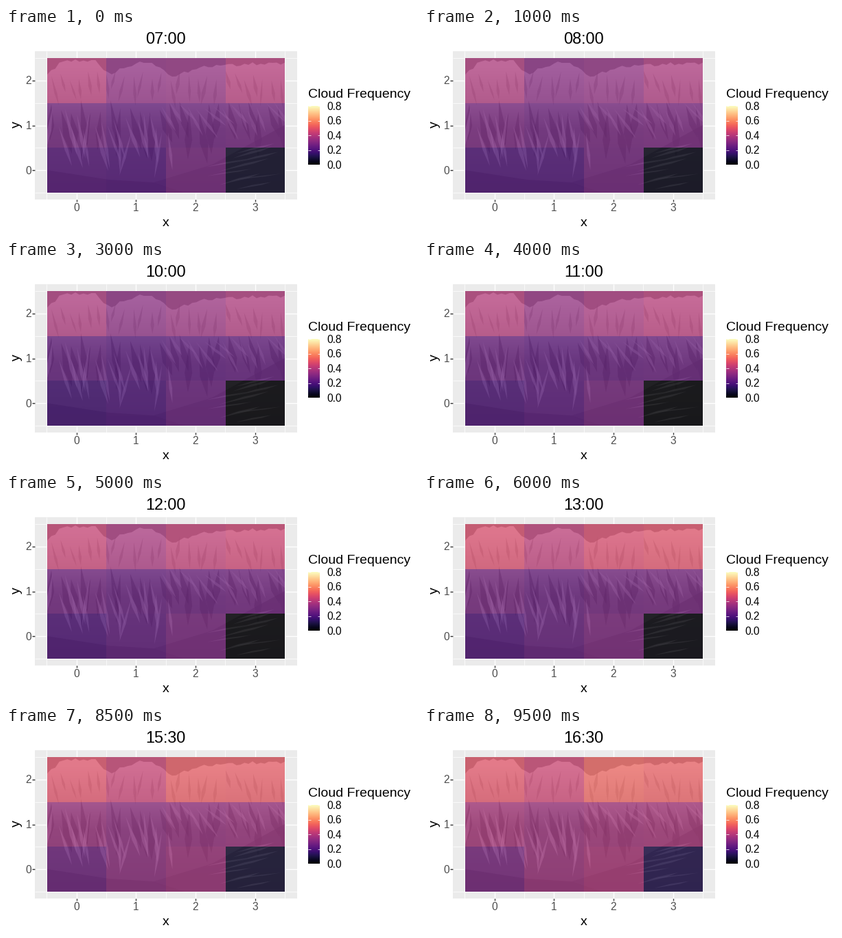
Write a matplotlib script that moves like this. It is 600 px wide and 300 px high and loops after 10 s.

```python
import matplotlib.pyplot as plt
import numpy as np
from matplotlib.animation import FuncAnimation
from matplotlib.patches import Polygon, Rectangle

plt.rcParams["font.family"] = "Liberation Sans"
W, H, DPI = 600, 300, 100
FRAMES, INTERVAL = 20, 500
LEFT, RIGHT, TOP, BOTTOM = 60, 406, 44, 241
X_EDGES = np.round(np.linspace(LEFT, RIGHT, 5))
Y_EDGES = np.round(np.linspace(TOP, BOTTOM, 4))
rng = np.random.default_rng(4)

# Daily course of each height band, on a 0..1 colour scale
KEY_STEPS = [0, 2, 4, 8, 12, 19]
SUMMIT = [.46, .44, .42, .47, .57, .61]
SLOPE = [.33, .35, .27, .31, .34, .47]
VALLEY = [.30, .29, .24, .30, .32, .44]


def cloud_grid(i):
    summit, slope, valley = (np.interp(i, KEY_STEPS, band)
                             for band in (SUMMIT, SLOPE, VALLEY))
    late = i / (FRAMES - 1)
    grid = np.array([
        summit + np.array([.05 - .04 * late, -.05, -.04 + .1 * late, .04]),
        slope + np.array([.01, -.02, 0, .01]),
        valley + np.array([-.03 - .05 * late, -.04 + .05 * late, .05, 0]),
    ])
    grid[2, 3] = .14 * ((i - 8) / 11) ** 2   # the clearest corner
    return grid


fig = plt.figure(figsize=(W / DPI, H / DPI), dpi=DPI, facecolor="white")
ax = fig.add_axes([0, 0, 1, 1])
ax.axis("off")


def gray(level):
    return (level / 255,) * 3


def label(x, y, text, size, color="black", **kw):
    kw = {"ha": "center", "va": "baseline", **kw}
    return ax.text(x, y, text, fontsize=size, color=color, zorder=9, **kw)


def line(xs, ys, color, width, z=1):
    ax.plot(xs, ys, color=color, lw=width * 72 / DPI, zorder=z,
            solid_capstyle="butt")


def shape(points, level, alpha):
    patch = Polygon(points, fc=gray(level), ec="none", alpha=alpha, zorder=3)
    ax.add_patch(patch)
    patch.set_clip_path(scene)


def streak(x, y, dx, dy, width, level, alpha):
    """A thin spindle from (x, y), widest past its middle."""
    xm, ym = x + .6 * dx, y + .6 * dy
    shape([(x, y), (xm + width / 2, ym), (x + dx, y + dy), (xm - width / 2, ym)],
          level, alpha)


# Panel, grid and axes
ax.add_patch(Rectangle((42, 34), 381.5, 216.5, fc="#EBEBEB", ec="none", zorder=0))
for k in range(5):
    x = 59.3 + 86.7 * k
    line([x, x], [34, 250.5], "white", .7)
    if k < 4:
        x += 43.3
        line([x, x], [34, 250.5], "white", 1.4)
        line([x, x], [250.5, 254.2], "#333333", 1.4)
        label(x, 268, str(k), 11.2, "#4D4D4D")
for k in range(4):
    y = 240.9 - 65.6 * k
    line([42, 423.5], [y, y], "white", .7)
    if k < 3:
        y -= 32.8
        line([42, 423.5], [y, y], "white", 1.4)
        line([38.3, 42], [y, y], "#333333", 1.4)
        label(37, y + 5.6, str(k), 11.2, "#4D4D4D", ha="right")
label(232.7, 290, "x", 14)
label(15.2, 141.5, "y", 14, rotation=90, va="center")
clock = label(232.7, 23, "", 16.8)

# Mountain scene: sky, a shaded range, ribs and gullies
scene = Rectangle((LEFT, TOP), RIGHT - LEFT, BOTTOM - TOP,
                  fc=gray(140), ec="none", zorder=2)
ax.add_patch(scene)
peaks = [(60, 66), (84, 48), (130, 47), (150, 67), (190, 51), (215, 51),
         (240, 71), (285, 57), (345, 53), (406, 51)]
ridge_x = np.linspace(LEFT, RIGHT, 60)
ridge_y = np.interp(ridge_x, *zip(*peaks)) + rng.uniform(-2.5, 2.5, 60)
outline = Polygon([*zip(ridge_x, ridge_y), (RIGHT, BOTTOM), (LEFT, BOTTOM)],
                  transform=ax.transData)
shade = np.interp(np.arange(TOP, BOTTOM), [55, 105, 150, 240], [225, 185, 120, 95])
slope_image = ax.imshow(shade[:, None], cmap="gray", vmin=0, vmax=255,
                        aspect="auto", extent=[LEFT, RIGHT, BOTTOM, TOP],
                        zorder=2.5)
slope_image.set_clip_path(outline)

for x in np.linspace(66, 400, 26):          # rock ribs near the summits
    streak(x, rng.uniform(62, 78), rng.uniform(-12, 12), rng.uniform(25, 45),
           rng.uniform(3, 6), 110, .4)
for x in np.linspace(66, 396, 24):          # wooded spurs
    streak(x, rng.uniform(105, 125), rng.uniform(-15, 20), rng.uniform(45, 75),
           rng.uniform(8, 14), 45, .4)
for x in np.linspace(68, 236, 20):          # steep snow gullies on the left
    streak(x, rng.uniform(112, 155), rng.uniform(-18, 22), rng.uniform(50, 70),
           rng.uniform(4, 7), 230, .5)
for x in np.linspace(226, 390, 14):         # slanting gullies on the right
    streak(x, rng.uniform(108, 122), rng.uniform(12, 34), rng.uniform(25, 50),
           rng.uniform(4, 7), 225, .45)
shape([(LEFT, 208), (150, 222), (215, 226), (260, BOTTOM), (LEFT, BOTTOM)], 65, .6)
shape([(215, 226), (300, 200), (RIGHT, 142), (RIGHT, BOTTOM), (240, BOTTOM)], 75, .6)
for y in np.linspace(184, 236, 9):          # scree bands in the near corner
    x = rng.uniform(290, 345)
    streak(x, y, rng.uniform(50, 75), -rng.uniform(8, 20), 14, 215, .4)

tiles = ax.pcolormesh(X_EDGES, Y_EDGES, cloud_grid(0), cmap="magma",
                      vmin=0, vmax=1, alpha=.7, zorder=5)

# Colour bar
label(440, 102, "Cloud Frequency", 14, ha="left")
ax.imshow(np.linspace(1, 0, 256)[:, None], cmap="magma", aspect="auto", zorder=5,
          extent=[440, 457, 200, 114])
for k in range(5):
    y = 200 - k * 21.5
    for x in (440, 453.5):
        line([x, x + 3.5], [y, y], "white", .75, 6)
    label(467, y + 5.8, f"{k * .2:.1f}", 11.2, ha="left")

ax.set_xlim(0, W)
ax.set_ylim(H, 0)


def update(i):
    minutes = 7 * 60 + 30 * i
    clock.set_text(f"{minutes // 60:02d}:{minutes % 60:02d}")
    tiles.set_array(cloud_grid(i))
    return clock, tiles


anim = FuncAnimation(fig, update, frames=FRAMES, interval=INTERVAL,
                     repeat=True, repeat_delay=0, blit=False)
plt.show()
```
